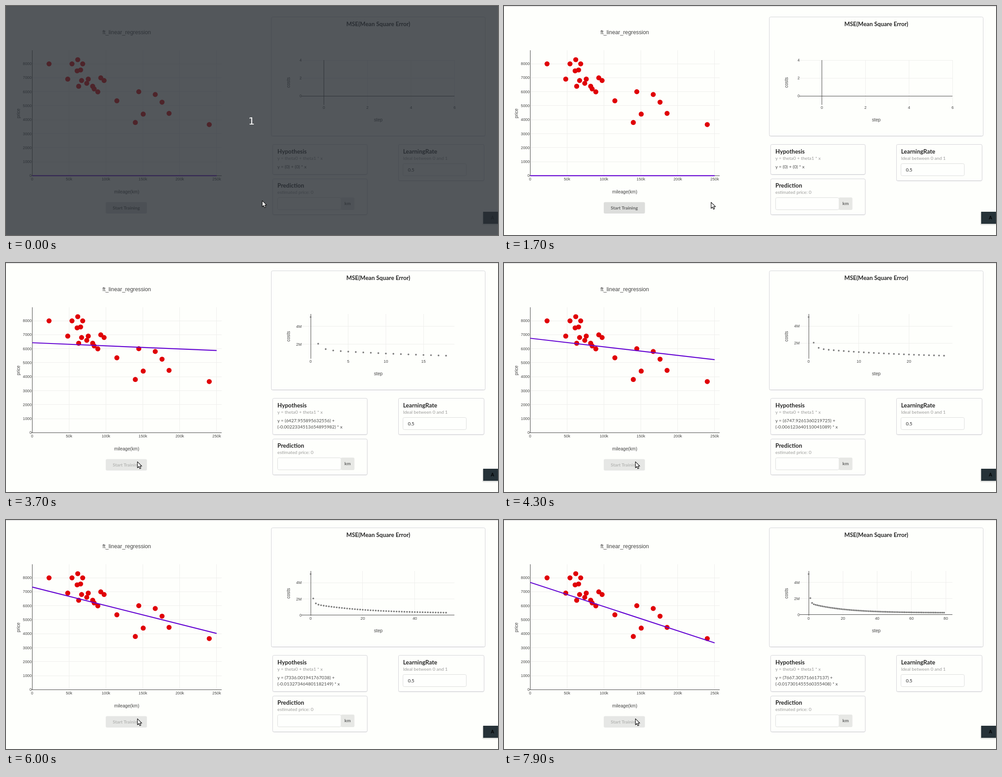
An HTML page that plays this animation: 1095 by 512 pixels, repeating every 8000 ms.

```html
<!DOCTYPE html>
<html lang="en">
<head>
<meta charset="utf-8">
<title>Linear regression training</title>
<style>
  html, body { margin: 0; width: 100%; height: 100%; overflow: hidden; background: #fefffc; }
  svg { display: block; width: 1095px; height: 512px; }
  text { font: 10.22px Lato, sans-serif; fill: #4a4a4a; white-space: pre; }
  .head { font-size: 13px; font-weight: bold; fill: #262626; }
  .meta { fill: #9c9c9b; }
  .bold { font-weight: bold; fill: #636463; }
  .tick, .axis, .title { font-family: "Liberation Sans", Arial, sans-serif; fill: #444; }
  .tick { font-size: 8.75px; }
  .axis { font-size: 10.15px; }
  .title { font-size: 12.3px; }
  .mid { text-anchor: middle; }
  .end { text-anchor: end; }
  .grid { stroke: #eeeeec; shape-rendering: crispEdges; }
  .zero { stroke: #444; shape-rendering: crispEdges; }
</style>
</head>
<body>
<svg id="stage" viewBox="0 0 1095 512"></svg>
<script>
const LOOP = 8000, START = 2300;
const cars = [
  [240000, 3650], [139800, 3800], [150500, 4400], [185530, 4450], [176000, 5250], [114800, 5350],
  [166800, 5800], [89000, 5990], [144500, 5999], [84000, 6200], [82029, 6390], [63060, 6390],
  [74000, 6600], [97500, 6800], [67000, 6800], [76025, 6900], [48235, 6900], [93000, 6990],
  [60949, 7490], [65674, 7555], [54000, 7990], [68500, 7990], [22899, 7990], [61789, 8290]
];

// Gradient descent on mileage scaled to 0..1
function train(steps, rate) {
  const kms = cars.map(c => c[0]), low = Math.min(...kms), span = Math.max(...kms) - low;
  const m = cars.length, history = [{ a: 0, b: 0 }];
  const data = cars.map(([km, price]) => [(km - low) / span, price]);
  let a = 0, b = 0;
  for (let i = 0; i < steps; i++) {
    let ga = 0, gb = 0, cost = 0;
    for (const [u, y] of data) {
      const err = a + b * u - y;
      ga += err;
      gb += err * u;
    }
    a -= rate * ga / m;
    b -= rate * gb / m;
    for (const [u, y] of data) cost += (a + b * u - y) ** 2;
    history.push({ a, b: b / span, cost: cost / (2 * m) });
  }
  return history;
}
const history = train(80, 0.5);

// Training progress: [ms, steps done], with moments where the picture stalls
const progress = [[2300, 2], [2700, 5], [3700, 19], [5000, 39], [6900, 66], [7900, 80]];
const stalls = [2600, 3100, 4100, 4600, 5300, 5800, 7400];

function stepsAt(tick) {
  if (tick < START) return 0;
  if (stalls.includes(tick)) tick -= 100;
  const k = Math.max(1, progress.findIndex(p => p[0] >= tick));
  const [t0, n0] = progress[k - 1], [t1, n1] = progress[k];
  return Math.round(n0 + (n1 - n0) * (tick - t0) / (t1 - t0));
}

const text = (x, y, s, cls = "", more = "") => `<text x="${x}" y="${y}" class="${cls}" ${more}>${s}</text>`;
const line = (x1, y1, x2, y2, cls, more = "") =>
  `<line x1="${x1}" y1="${y1}" x2="${x2}" y2="${y2}" class="${cls}" ${more}/>`;
const rect = (x, y, w, h, fill, more = "") =>
  `<rect x="${x}" y="${y}" width="${w}" height="${h}" fill="${fill}" ${more}/>`;
const dot = (x, y, r, fill) => `<circle cx="${x}" cy="${y}" r="${r}" fill="${fill}"/>`;
const shift = (dy, body) => `<g transform="translate(0 ${dy})">${body}</g>`;
const upright = (x, y, s) => text(x, y, s, "axis mid", `transform="rotate(-90 ${x} ${y})"`);
const snap = v => Math.floor(v) + 0.5;
const card = (x, y, w, h) =>
  rect(x, y + 1, w, h, "none", 'rx="3" stroke="#e6e6e8"') +
  rect(x, y, w, h, "#fefffc", 'rx="3" stroke="#d3d3d8"');
const field = (x, y, w, h) => rect(x, y, w, h, "#fefffd", 'rx="3" stroke="#dcdddc"');

function pricePlot({ a, b }) {
  const px = km => 58.2 + km * 0.0016424, py = p => 379.3 - p * 0.03128;
  let out = text(268.7, 63, "ft_linear_regression", "title mid");
  for (let k = 0; k <= 250; k += 50) {
    const x = px(k * 1000);
    if (k) out += line(snap(x), 99, snap(x), 379, "grid");
    out += text(x, 390.2, k ? k + "k" : 0, "tick mid");
  }
  for (let p = 0; p <= 8000; p += 1000) {
    if (p) out += line(58, snap(py(p)), 480, snap(py(p)), "grid");
    out += text(57, py(p) + 3.1, p, "tick end");
  }
  out += line(58.5, 99, 58.5, 380, "zero") + line(56, 379.5, 480, 379.5, "zero");
  for (const [km, p] of cars) out += dot(px(km), py(p), 5.6, "#e00006");
  out += line(px(0), py(a), px(250000), py(a + b * 250000), "", 'stroke="#6200d2" stroke-width="2.2"');
  return out + text(268.7, 418.6, "mileage(km)", "axis mid") + upright(30.5, 240, "price");
}

// Tick spacing of 1, 2 or 5 times a power of ten
function spacing(rough) {
  const base = 10 ** Math.floor(Math.log10(rough));
  return base * [2, 5, 10].find(s => s >= rough / base);
}

function ticks(low, high, parts) {
  const d = spacing((high - low) / parts), list = [];
  for (let k = Math.ceil(low / d - 1e-9); k * d <= high * (1 + 1e-9); k++) list.push(k * d);
  return list;
}

function costPlot(n) {
  const L = 659, R = 998.4, T = 121, B = 221;
  const costs = history.slice(1, n + 1).map(s => s.cost);
  let x0 = -1, x1 = 6, y0 = -1, y1 = 4;
  if (n) {
    const top = costs[0], low = costs[n - 1], padX = (n - 1) * 0.0632, padY = (top - low) * 0.0795;
    x0 = -padX; x1 = n - 1 + padX; y0 = low - padY; y1 = top + padY;
  }
  const px = v => L + (v - x0) / (x1 - x0) * (R - L);
  const py = v => B - (v - y0) / (y1 - y0) * (B - T);
  let out = "";
  for (const v of ticks(x0, x1, 5.24)) {
    if (v < 0) continue;
    if (v) out += line(snap(px(v)), T, snap(px(v)), B, "grid");
    out += text(px(v), 230.2, v, "tick mid");
  }
  for (const v of ticks(y0, y1, 5)) {
    if (v < 0) continue;
    if (v) out += line(L, snap(py(v)), R, snap(py(v)), "grid");
    out += text(658, py(v) + 3.1, v >= 1e6 ? v / 1e6 + "M" : v, "tick end");
  }
  out += line(snap(px(0)), T, snap(px(0)), B, "zero");
  if (y0 < 0 || py(0) <= B) out += line(L - 1, snap(py(0)), R, snap(py(0)), "zero");
  costs.forEach((c, i) => out += dot(px(i), py(c), 1.9, "#7c7c7c"));
  return out + text(828.6, 258, "step", "axis mid") + upright(632, 171, "costs");
}

function panels(n) {
  const { a, b } = history[n], up = n ? -7 : 0;
  const formula = n
    ? text(604, 362.8, `y = (${a}) +`) + text(604, 376.6, `(${b}) * x`)
    : text(604, 362.8, "y = (0) + (0) * x");
  return shift(up,
      card(590.5, 24.5, 476, 266) + text(828.5, 45, "MSE(Mean Square Error)", "head mid") + costPlot(n) +
      card(593.5, 309.5, 210.5, n ? 81 : 67) + text(604, 329.8, "Hypothesis", "head") +
      text(604, 343.6, "y = theta0 + theta1 * x", "meta") + formula +
      card(873.5, 309.5, 190.5, 81) + text(883.7, 329.8, "LearningRate", "head") +
      text(883.7, 343.6, "Ideal between 0 and 1", "meta") +
      field(883.5, 352.5, 141, 27) + text(894.5, 369.6, "0.5", "", 'style="fill:#222"')) +
    shift(-up,
      card(593.5, 386.5, 210.5, 80) + text(604, 406.3, "Prediction", "head") +
      text(604, 420, "estimated price: 0", "meta") +
      field(604.5, 428.5, 141, 27) + rect(745, 428, 30.5, 28, "#e7e8e5", 'rx="3"') +
      text(760.3, 444.6, "km", "bold mid"));
}

function button(busy, hover) {
  return `<g opacity="${busy ? 0.45 : 1}">` +
    rect(222, 438.5, 91.7, 25.5, hover ? "#cacbca" : "#dddedc", 'rx="3"') +
    text(267.7, 454.6, "Start Training", "bold mid") + "</g>";
}

function cursor(x, y) {
  return `<path transform="translate(${x} ${y})" d="M0 0V13.6L3.2 10.7L5.3 15.6L7.7 14.5L5.6 9.8H9.8Z"
    fill="#fff" stroke="#111" stroke-width="1.2" stroke-linejoin="round"/>`;
}

function scene(tick) {
  const n = stepsAt(tick);
  const p = Math.min(1, Math.max(0, (tick - 1400) / 700)), ease = p * p * (3 - 2 * p);
  const x = 570.3 - 277.8 * ease, y = 435.3 + 9 * ease;
  let out = rect(0, 0, 1095, 512, "#fefffc") + rect(0, 0, 1095, 1, "#dcdcdc") + rect(0, 1, 1095, 1, "#f0f0ef") +
    pricePlot(history[n]) + panels(n) + button(n > 0, x < 313) +
    rect(1060, 460, 36, 30, "#000", 'rx="3" opacity=".1"') +
    rect(1062, 460, 33, 27, "#263238") +
    text(1082.7, 477, "A", "mid", 'style="font:bold 11px Roboto,sans-serif;fill:#050708"');
  if (tick < 100) {
    out += rect(0, 0, 1095, 512, "rgb(40,45,52)", 'opacity=".8"') +
      text(546.5, 265, "1", "mid", 'style="font:22px DejaVu Sans,sans-serif;fill:#fff"');
  }
  return out + cursor(x, y);
}

const stage = document.getElementById("stage");
let shown = -1;
function frame(now) {
  const tick = Math.floor(now % LOOP / 100) * 100;
  if (tick !== shown) stage.innerHTML = scene(shown = tick);
  requestAnimationFrame(frame);
}
frame(performance.now());
</script>
</body>
</html>
```
